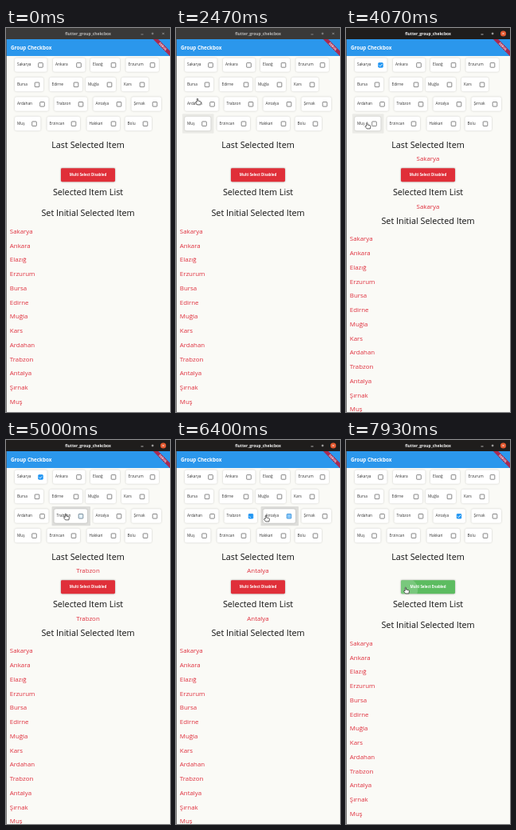
An HTML page for the animation above (8000 ms loop, 206 by 480 pixels).

```html
<!DOCTYPE html>
<html lang="tr">
<head>
<meta charset="utf-8">
<title>Group Checkbox</title>
<style>
html, body { margin: 0; width: 100%; height: 100%; overflow: hidden; background: #fafaf6; }
svg { display: block; width: 100%; height: 100%; font-family: "Open Sans", "Noto Sans", sans-serif; }
.bold { font-weight: 700; fill: #fff; }
.mid { text-anchor: middle; }
.head { font-size: 10.8px; fill: #111; text-anchor: middle; }
.item { font-size: 7.9px; fill: #df2f3d; }
.name { font-size: 4.8px; fill: #333; }
.card { fill: #fff; filter: drop-shadow(0 .5px .8px #0003); }
</style>
</head>
<body>
<svg id="stage" viewBox="0 0 206 480"></svg>
<script>
const LOOP = 8000;
const BLUE = [33, 150, 243], GREY = [105, 105, 105];
const stage = document.getElementById('stage');

function add(tag, attrs, parent = stage, text) {
  const el = document.createElementNS('http://www.w3.org/2000/svg', tag);
  set(el, attrs);
  if (text) el.textContent = text;
  parent.appendChild(el);
  return el;
}
function set(el, attrs) {
  for (const key in attrs) el.setAttribute(key, attrs[key]);
}
const label = (x, y, cls, text, parent) => add('text', { x, y, class: cls }, parent, text);
const clamp = v => Math.max(0, Math.min(1, v));
const mix = (a, b, p) => `rgb(${a.map((v, i) => Math.round(v + (b[i] - v) * p))})`;

// Window frame and app bar
add('rect', { width: 206, height: 480, fill: '#fafaf6' });
add('rect', { y: 14, width: 206, height: 21, fill: '#2b97ec' });
label(6, 27.2, 'bold', 'Group Checkbox').style.fontSize = '6.3px';
add('path', { d: 'M184.8 14h6.4L206 28.8v6.4z', fill: '#a92a50' });
const debug = add('text', { class: 'bold mid', transform: 'translate(197 23) rotate(45)', y: 1.3 }, stage, 'DEBUG');
debug.style.fontSize = '3.6px';

const bar = add('rect', { width: 206, height: 14 });
const title = label(103, 8.6, 'bold mid', 'flutter_group_chekcbox');
title.style.fontSize = '4.94px';
const closeDot = add('circle', { cx: 197.5, cy: 7, r: 3.6, fill: '#e4572e' });
const icons = add('path', {
  d: 'M169.5 8h3M182.7 7h2.8M184.1 5.6v2.8M196.3 5.8l2.4 2.4m0-2.4l-2.4 2.4',
  fill: 'none', 'stroke-width': .7
});

// Checkbox cards: name, text x, box centre x
const rows = [
  [['Sakarya', 14, 43.5], ['Ankara', 62, 91.5], ['Elazığ', 109, 135], ['Erzurum', 153.5, 184]],
  [['Bursa', 14, 39], ['Edirne', 57.5, 88], ['Muğla', 103, 130], ['Kars', 148, 171]],
  [['Ardahan', 14, 45.5], ['Trabzon', 63.5, 94], ['Antalya', 112.5, 142], ['Şırnak', 160.5, 187]],
  [['Muş', 14, 35.5], ['Erzincan', 54.5, 85], ['Hakkari', 104.5, 135], ['Bolu', 152.5, 175]]
];
const halos = add('g', {});
const cards = rows.flatMap((row, r) => row.map(([name, x, bx]) => {
  const cy = 46.2 + r * 24.45, left = x - 3, width = bx + 8 - left;
  const area = { x: left - 3, y: cy - 12.2, width: width + 7, height: 24.4 };
  const halo = add('rect', { ...area, rx: 1 }, halos);
  add('rect', { x: left, y: cy - 8.8, width, height: 17.4, rx: 2.5, class: 'card' });
  label(x, cy + 1.1, 'name', name);
  const box = add('rect', { x: bx - 2.8, y: cy - 2.6, width: 5.6, height: 5.6, rx: .6, 'stroke-width': .8 });
  const tick = add('path', {
    d: `M${bx - 1.9} ${cy + .3}l1.3 1.3 2.6-2.8`, fill: 'none', stroke: '#fff',
    'stroke-width': .9, pathLength: 1, 'stroke-dasharray': '1 2'
  });
  return { name, area, halo, box, tick };
}));

// Headings, button and list
label(103, 149.6, 'head', 'Last Selected Item');
label(103, 209.2, 'head', 'Selected Item List');
const last = label(103, 166.4, 'item mid');
const chosen = label(103, 226.4, 'item mid');
const list = add('g', {});
label(103, 235.2, 'head', 'Set Initial Selected Item', list);
cards.slice(0, 14).forEach((c, i) => label(4.8, 256.8 + i * 17.75, 'item', c.name, list));

const clip = add('clipPath', { id: 'btnClip' });
const shape = { x: 69, y: 175.2, width: 68, height: 17, rx: 1.4 };
add('rect', shape, clip);
const button = add('rect', { ...shape, style: 'filter:drop-shadow(0 .7px .8px #0005)' });
const ripple = add('circle', { cx: 76, cy: 187, fill: '#fff', opacity: .18, 'clip-path': 'url(#btnClip)' });
const caption = label(103, 185.3, 'bold mid');
caption.style.fontSize = '4.45px';

add('rect', { y: 14, width: .8, height: 466, fill: '#555' });

const pointer = add('g', { stroke: '#222', 'stroke-width': .7, 'stroke-linejoin': 'round', fill: '#fff' });
const hand = add('path', {
  d: 'M-1.8 .6V-3.4q.7-1.3 1.4 0V-1l3 .7q.9.3.8 1.3L2.9 3.9H-1.3L-3.5 1.2q0-1.2 1.7-.6z'
}, pointer);
const arrow = add('path', { d: 'M-2-4v7l1.7-1.5L.8 4l1.1-.5L.9 1.1h2.2z', fill: '#222', stroke: '#fff' }, pointer);

// Pointer stops: time, x, y
const stops = [
  [1540, -5, 176], [2400, 30, 120], [2470, 28, 92], [2930, 24.5, 49], [3430, 24.5, 49],
  [3900, 27.5, 122], [4070, 27.5, 122], [4470, 76, 96], [5640, 76, 96],
  [6070, 114, 98], [6640, 114, 98], [6730, 114.5, 99], [6840, 114.5, 99], [7670, 76, 188]
];
function pointerAt(t) {
  const i = stops.findIndex(s => s[0] > t);
  if (i === 0) return stops[0].slice(1);
  if (i < 0) return stops[stops.length - 1].slice(1);
  const a = stops[i - 1], b = stops[i];
  let p = (t - a[0]) / (b[0] - a[0]);
  p = p * p * (3 - 2 * p);
  return [a[1] + (b[1] - a[1]) * p, a[2] + (b[2] - a[2]) * p];
}
const inside = ([x, y], a) => x >= a.x && x <= a.x + a.width && y >= a.y && y <= a.y + a.height;

// Selections: time, name
const picks = [[3265, 'Sakarya'], [4990, 'Trabzon'], [6350, 'Antalya']];
const RESET = 7865;

function checkAmount(name, t) {
  const i = picks.findIndex(p => p[1] === name);
  if (i < 0) return 0;
  const on = clamp((t - picks[i][0]) / 190);
  const off = picks[i + 1] ? clamp((t - picks[i + 1][0]) / 190) : 0;
  return on - off;
}

function draw(t) {
  const active = t >= 3125;
  set(bar, { fill: active ? '#1f1d1c' : '#3a3938' });
  set(title, { style: `font-size:4.94px;fill:${active ? '#f2f2f2' : '#b9b8b6'}` });
  set(closeDot, { opacity: active ? 1 : 0 });
  set(icons, { stroke: active ? '#f2f2f2' : '#aaa' });

  const pos = pointerAt(t), trail = pointerAt(t - 70);
  const pick = picks.filter(p => t >= p[0]).pop();
  for (const c of cards) {
    const p = checkAmount(c.name, t);
    const pressed = pick && pick[1] === c.name && t - pick[0] < 230;
    set(c.halo, { fill: pressed ? '#dededb' : '#ebebe7', opacity: inside(trail, c.area) ? 1 : 0 });
    set(c.box, {
      stroke: mix(GREY, BLUE, clamp(p * 3)),
      fill: mix([255, 255, 255], BLUE, clamp(p * 2))
    });
    set(c.tick, { 'stroke-dashoffset': 1 - clamp(p * 2 - 1), opacity: p > .5 ? 1 : 0 });
  }

  const done = t >= RESET;
  last.textContent = chosen.textContent = pick && !done ? pick[1] : '';
  set(list, { transform: `translate(0 ${pick && !done ? 9.6 : 0})` });
  set(button, { fill: done ? '#5cbc60' : '#e02f39' });
  caption.textContent = 'Multi Select ' + (done ? 'Enabled' : 'Disabled');
  set(ripple, { r: done ? 6 + (t - RESET) / 8 : 0 });

  const link = inside(pos, shape) || cards.some(c => inside(pos, c.area));
  set(pointer, { transform: `translate(${pos})`, opacity: t < 1595 ? 0 : 1 });
  set(hand, { opacity: link ? 1 : 0 });
  set(arrow, { opacity: link ? 0 : 1 });
}

const start = performance.now();
function tick() {
  draw((performance.now() - start) % LOOP);
  requestAnimationFrame(tick);
}
tick();
</script>
</body>
</html>
```
